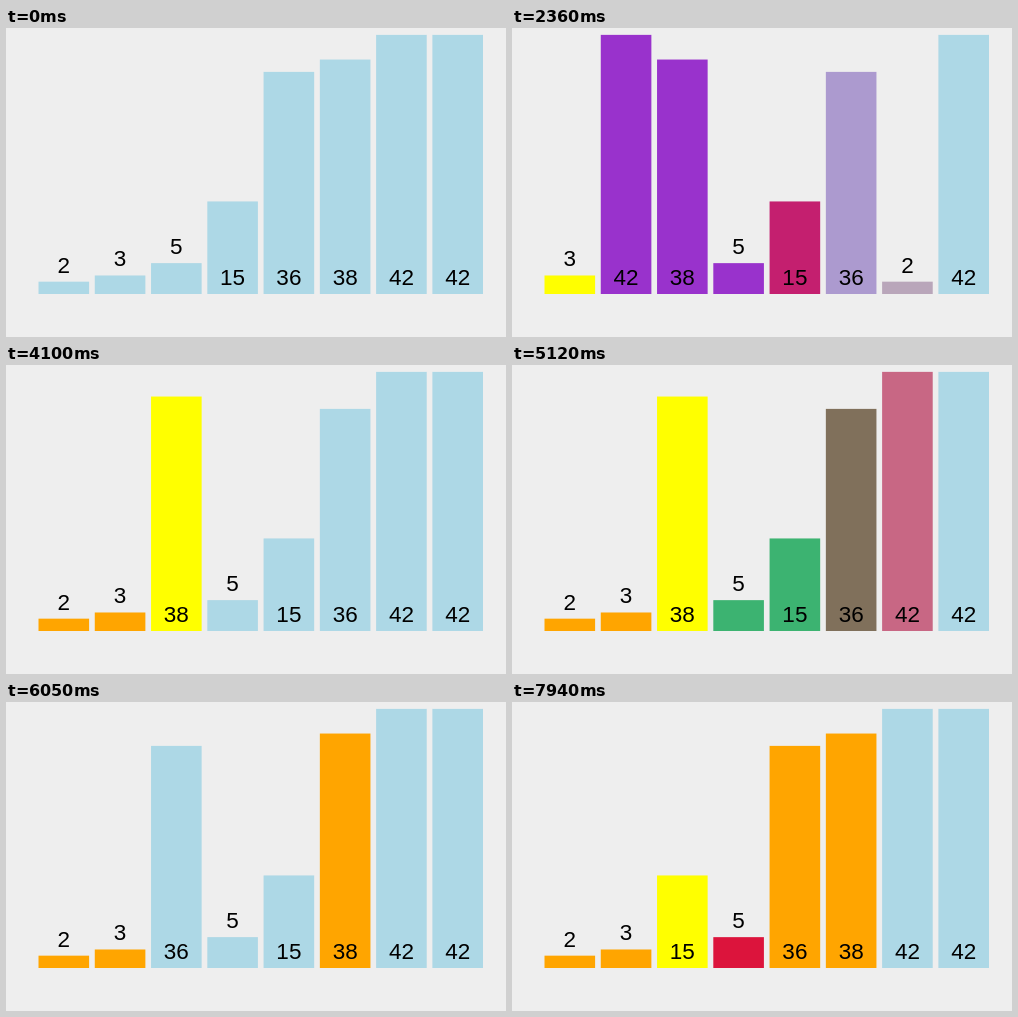
An HTML page with a canvas for the animation above (8000 ms loop, 500 by 309 pixels).

```html
<!DOCTYPE html>
<html lang="en">
<head>
<meta charset="utf-8">
<title>Quick sort</title>
<style>
  html, body { margin: 0; width: 100%; height: 100%; overflow: hidden; background: #eee; }
  canvas { display: block; }
</style>
</head>
<body>
<canvas id="stage" width="500" height="309"></canvas>
<script>
const ctx = document.getElementById('stage').getContext('2d');
const LOOP = 8000;
const LEFT = 32.5, PITCH = 56.27, WIDTH = 50.6, BASE = 266, UNIT = 6.17;

const BLUE = [173, 216, 230];
const YELLOW = [255, 255, 0];
const CRIMSON = [220, 20, 60];
const GREEN = [60, 179, 113];
const PURPLE = [153, 50, 204];
const ORANGE = [255, 165, 0];

// Start of each step of the sort, in ms
const starts = [
  445, 935, 1219, 1500, 1765, 2065, 2253, 2301, 2545, 2757, 2850,
  3145, 3358, 3630, 3955, 4207, 4495, 4765, 5042, 5305, 5610,
  5818, 5890, 6120, 6415, 6685, 6930, 7170, 7350, 7620, 7773
];

const values = [3, 42, 38, 5, 15, 36, 2, 42];
const sortedSlots = [1, 6, 5, 2, 3, 4, 0, 7];

const ease = p => p < 0.5 ? 4 * p ** 3 : 1 - 4 * (1 - p) ** 3;

// A pose is one [slot, r, g, b] per bar
function poseAt(step, t) {
  const k = ease(Math.min(1, Math.max(0, (t - step.start) / step.time)));
  return step.from.map((bar, i) => bar.map((v, j) => v + (step.to[i][j] - v) * k));
}

function buildSteps() {
  const first = sortedSlots.map(slot => [slot, ...BLUE]);
  const steps = [{ start: 0, time: 1, from: first, to: first }];
  const order = values.map((_, i) => i);
  const colors = values.map(() => BLUE);

  // Every step restarts all bars from wherever they are
  function push() {
    const start = starts[steps.length - 1];
    if (start === undefined) return;
    steps.push({
      start,
      time: steps.length === 1 ? 500 : 150,
      from: poseAt(steps[steps.length - 1], start),
      to: values.map((_, id) => [order.indexOf(id), ...colors[id]])
    });
  }

  const paint = (slot, color) => { colors[order[slot]] = color; };
  const swap = (a, b) => { [order[a], order[b]] = [order[b], order[a]]; };

  function sort(lo, hi) {
    if (lo > hi) return;
    if (lo === hi) return paint(lo, ORANGE);
    const pivot = values[order[lo]];
    let mid = lo;
    paint(lo, YELLOW);
    push();
    for (let i = lo + 1; i <= hi; i++) {
      const less = values[order[i]] < pivot;
      paint(i, CRIMSON);
      push();
      paint(i, less ? GREEN : PURPLE);
      if (less && ++mid !== i) {
        push();
        swap(mid, i);
        push();
      }
    }
    push();
    swap(lo, mid);
    push();
    for (let i = lo; i <= hi; i++) paint(i, i === mid ? ORANGE : BLUE);
    push();
    sort(lo, mid - 1);
    sort(mid + 1, hi);
  }

  push();
  sort(0, values.length - 1);
  return steps;
}

const steps = buildSteps();

function draw(t) {
  const step = steps.filter(s => s.start <= t).pop();
  ctx.fillStyle = '#eee';
  ctx.fillRect(0, 0, 500, 309);
  ctx.font = '22.5px "Liberation Sans", Arial, sans-serif';
  ctx.textAlign = 'center';
  poseAt(step, t).forEach(([slot, ...rgb], i) => {
    const x = LEFT + slot * PITCH;
    const h = values[i] * UNIT;
    ctx.fillStyle = `rgb(${rgb.map(Math.round).join(',')})`;
    ctx.fillRect(x, BASE - h, WIDTH, h);
    ctx.fillStyle = '#000';
    ctx.fillText(values[i], x + WIDTH / 2, BASE - 9 - (values[i] < 10 ? h : 0));
  });
}

const origin = performance.now();
function tick() {
  draw((performance.now() - origin) % LOOP);
  requestAnimationFrame(tick);
}
tick();
</script>
</body>
</html>
```
